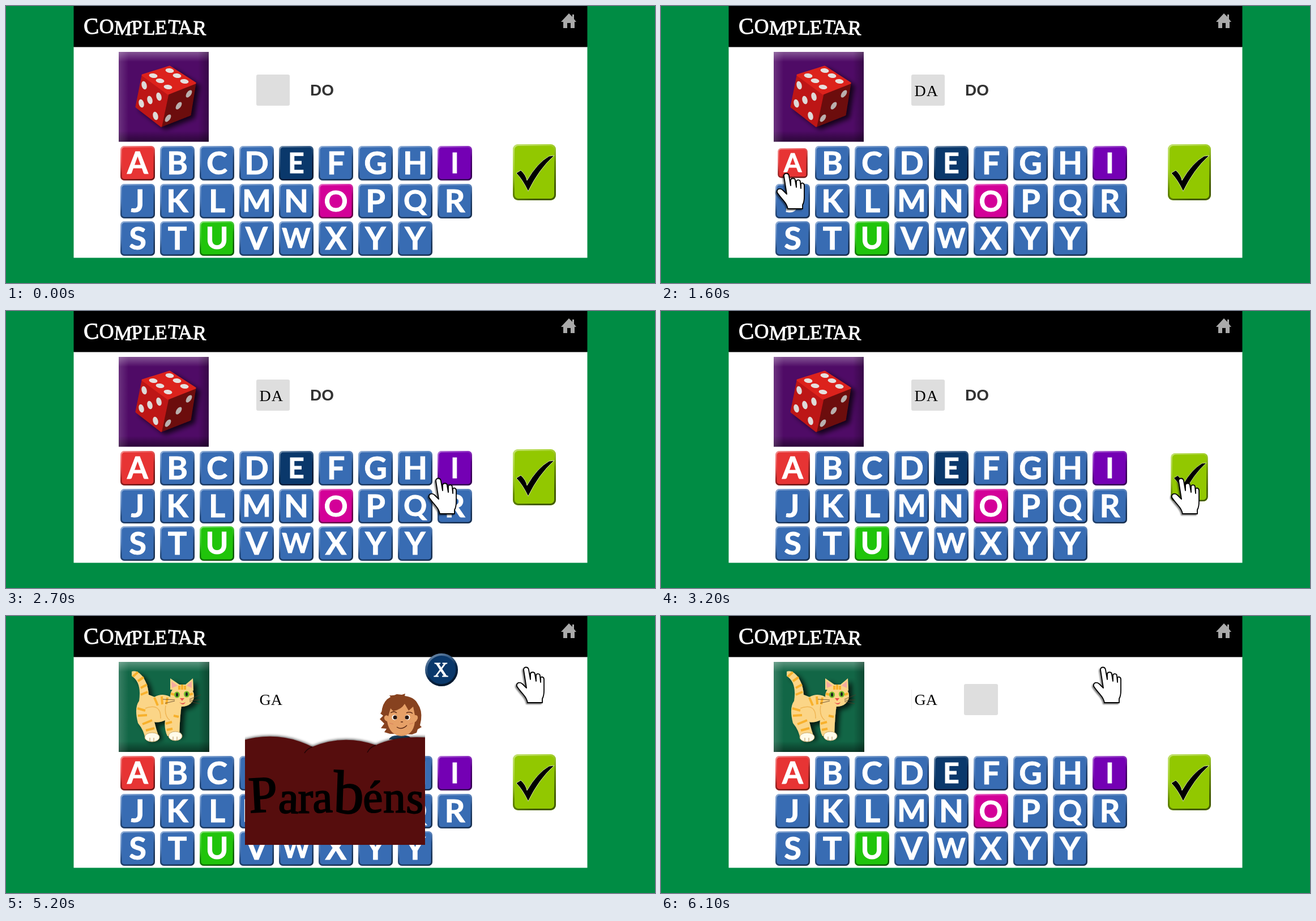
Animation of 1146x489 px, one loop 6.2 s. Source, as an HTML page:

```html
<!DOCTYPE html>
<html lang="pt">
<head>
<meta charset="utf-8">
<title>Completar</title>
<style>
  html, body { margin: 0; width: 100%; height: 100%; overflow: hidden; background: #008c44; }
  svg { display: block; }
  .serif { font-family: "Liberation Serif", serif; }
  .key text { font: 700 56px Lato, sans-serif; fill: #fff; stroke: #fff; text-anchor: middle; }
  .press { transform-box: fill-box; transform-origin: center; }
</style>
</head>
<body>
<svg width="1146" height="489" viewBox="0 0 1146 489">
  <defs>
    <linearGradient id="rim" x2=".5" y2="1">
      <stop stop-color="#fff" stop-opacity=".45"/>
      <stop offset=".35" stop-color="#fff" stop-opacity=".2"/>
      <stop offset=".65" stop-opacity=".3"/>
      <stop offset="1" stop-opacity=".55"/>
    </linearGradient>
    <linearGradient id="shadeY" x2="0" y2="1">
      <stop stop-color="#fff" stop-opacity=".3"/>
      <stop offset=".11" stop-color="#fff" stop-opacity="0"/>
      <stop offset=".88" stop-opacity="0"/>
      <stop offset="1" stop-opacity=".45"/>
    </linearGradient>
    <linearGradient id="shadeX">
      <stop stop-color="#fff" stop-opacity=".16"/>
      <stop offset=".11" stop-color="#fff" stop-opacity="0"/>
      <stop offset=".88" stop-opacity="0"/>
      <stop offset="1" stop-opacity=".3"/>
    </linearGradient>
    <filter id="drop" x="-30%" y="-30%" width="160%" height="160%">
      <feDropShadow dx="7" dy="5" stdDeviation="4" flood-opacity=".75"/>
    </filter>
    <filter id="handDrop" x="-30%" y="-30%" width="160%" height="160%">
      <feDropShadow dx="-2" dy="2" stdDeviation="1" flood-opacity=".5"/>
    </filter>
    <filter id="glow"><feDropShadow dx="0" dy="-1" stdDeviation="2.500" flood-opacity=".75"/></filter>
    <clipPath id="cardClip"><path d="M422 130H740V404H422Z"/></clipPath>
  </defs>

  <path fill="#fff" d="M119.500 72H1026.500V444.500H119.500Z"/>
  <path d="M119.500 0H1026.500V72.500H119.500Z"/>
  <text class="serif" x="138" y="50" dy="0 -2 2 0 0 0 -2 2 0" rotate="-4 0 3 -3 2 -2 4 -3 3"
        font-size="35.500" fill="#fff" stroke="#fff" stroke-width="1"><tspan font-size="40">C</tspan>OMPLETAR</text>
  <path fill="#aaa" d="M994 13L980 28H984V39H991V30H997V39H1004V28H1007L1003 23V15H1000V19Z"/>

  <g id="dicePage">
    <path fill="#4f0b66" d="M199 81H358V239.500H199Z"/>
    <path fill="url(#shadeY)" d="M199 81H358V239.500H199Z"/>
    <path fill="url(#shadeX)" d="M199 81H358V239.500H199Z"/>
    <g filter="url(#drop)" stroke-linejoin="round" stroke-width="3">
      <path fill="#6c0c0d" stroke="#6c0c0d" d="M286 155L334 136L325 192L274 212Z"/>
      <path fill="#bd1513" stroke="#bd1513" d="M241 123L286 155L274 212L230 178Z"/>
      <path fill="#dc231e" stroke="#dc231e" d="M241 122L289 107L334 136L286 155Z"/>
    </g>
    <g id="pips"></g>
    <rect x="442" y="121" width="59" height="55" rx="3" fill="#dedede"/>
    <text id="typed" class="serif" x="447.500" y="158.500" font-size="28" letter-spacing="1"></text>
    <text x="537" y="158" font-family="Liberation Sans, sans-serif" font-weight="700" font-size="28" fill="#333">DO</text>
  </g>

  <g id="catPage">
    <path fill="#126646" d="M199 81H359V240H199Z"/>
    <path fill="url(#shadeY)" d="M199 81H359V240H199Z"/>
    <path fill="url(#shadeX)" d="M199 81H359V240H199Z"/>
    <g filter="url(#drop)" fill="#fbd587">
      <path d="M222 98C235 93 251 114 252 139L262 143Q278 134 294 145L310 157Q307 177 306 210L285 212Q279 200 281 184Q270 189 262 187Q265 200 270 214L246 218Q244 202 233 189Q226 162 235 150Q240 117 222 106Z"/>
      <path d="M290 130L290 110L306 121H317L330 110L331 132Z"/>
      <ellipse cx="311" cy="141" rx="21" ry="19"/>
    </g>
    <g fill="#f5a9a0">
      <path d="M293 127L292 115L303 123Z"/><path d="M328 127L328 115L319 123Z"/>
    </g>
    <path fill="none" stroke="#f8b12c" stroke-width="4" d="M224 107L233 99M233 115L243 108M238 127L249 121M238 139L250 134M262 144L268 158M275 142L276 156M285 144L283 156M232 163L246 167M233 176L249 175M241 191L258 184M247 202L262 198M282 190L293 187M284 201L294 199M305 178L296 176M306 123V130M311 121V130M316 123V130M291 137L298 139M330 137L324 139"/>
    <path fill="none" stroke="#f0b655" stroke-width="1.500" d="M246 163Q274 153 273 181M282 158Q279 176 289 184"/>
    <g fill="#fffbea" stroke="#c9ac72">
      <ellipse cx="258" cy="214" rx="13" ry="8"/><ellipse cx="299" cy="212" rx="12" ry="8"/>
    </g>
    <path fill="none" stroke="#b8945b" d="M254 215V221M261 215V221M295 213V219M302 213V219"/>
    <g fill="#71bd2a">
      <ellipse cx="302" cy="139" rx="5" ry="5.500"/><ellipse cx="319" cy="138" rx="5" ry="5.500"/>
    </g>
    <g fill="#222">
      <ellipse cx="302" cy="139" rx="2" ry="3.500"/><ellipse cx="319" cy="138" rx="2" ry="3.500"/>
    </g>
    <path fill="#e8524f" d="M307 145H315L311 150ZM306 152Q311 156 317 152Q313 160 306 152Z"/>
    <path fill="none" stroke="#553c26" stroke-width=".8" d="M298 148L277 147M298 150L281 154M324 147L344 139M324 149L343 148M324 151L342 155"/>
    <text class="serif" x="447.500" y="157" font-size="28">GA</text>
    <g id="blank">
      <path stroke="#eee" d="M442.500 130V165"/>
      <rect x="535" y="120" width="60" height="55" rx="3" fill="#dedede"/>
    </g>
  </g>

  <g id="keys"></g>

  <g id="check" class="press">
    <rect x="895" y="244" width="76" height="99" rx="9" fill="#92c800"/>
    <rect x="896.500" y="245.500" width="73" height="96" rx="8" fill="none" stroke="url(#rim)" stroke-width="3"/>
    <path stroke="#eef5c8" stroke-width=".8" d="M901 295L909 290Q918 298 920 308Q938 277 959 265L968 264Q941 288 922 327Q912 306 901 295Z"/>
  </g>

  <g id="dialog">
    <g clip-path="url(#cardClip)">
      <path fill="#1f4668" d="M676 218Q680 209 697 211Q713 209 717 218Z"/>
      <path fill="#87421f" d="M660 182L666 176L661 172Q664 169 664 164Q667 149 679 143L677 140Q685 141 690 138L699 139L705 137L704 141Q721 143 727 155Q735 166 733 183L731 193L734 196L727 200L725 206L717 209L678 208L668 205L672 199L662 198L668 190Z"/>
      <path fill="#e6a067" d="M673 186Q667 184 668 178Q671 173 675 177L679 163L684 168Q698 165 704 155L711 167L719 160L722 175Q728 174 727 181Q724 187 722 187Q719 211 698 212Q677 210 673 186Z"/>
      <path fill="none" stroke="#5c2914" stroke-width="1.500" d="M679 171Q685 167 690 171M707 171Q713 168 718 172M690 196Q699 202 708 193M697 187H701"/>
      <path stroke="#d97f5c" d="M677 189L684 191M712 191L719 189"/>
      <g fill="#fff"><circle cx="686" cy="179" r="4.500"/><circle cx="709" cy="179" r="4.500"/></g>
      <g fill="#28150e"><circle cx="687" cy="179" r="3.500"/><circle cx="708" cy="179" r="3.500"/></g>
      <path filter="url(#glow)" fill="#560c0d" d="M410 222Q479 200 541 231Q596 208 653 228Q691 210 750 215V420H410Z"/>
      <path fill="none" stroke="#250506" stroke-width="1.500" d="M541 231Q532 234 527 242M653 228Q642 232 638 241"/>
    </g>
    <text class="serif" x="430" y="347" font-size="79" stroke="#000" stroke-width="2"
          rotate="-3 2 0 -2 2 -2 0 3"><tspan font-size="91">P</tspan>ara<tspan font-size="108">b</tspan>éns</text>
    <g id="close" class="press">
      <circle cx="769" cy="95" r="29" fill="#0a386b"/>
      <circle cx="769" cy="95" r="27" fill="none" stroke="url(#rim)" stroke-width="4"/>
      <text class="serif" x="768" y="107" font-size="36" fill="#fff" stroke="#fff" text-anchor="middle">X</text>
    </g>
  </g>

  <g id="hand">
    <path filter="url(#handDrop)" fill="#fff" stroke="#000" stroke-width="1.800" stroke-linejoin="round"
      d="M14 6C14 0 22 0 23 6L26 23V14C26 9 34 9 34 14L36 26V16C36 12 43 12 43 17L44 28V21C44 17 50 18 50 23V42Q50 52 47 57V64H21Q20 57 13 49Q6 41 2 35C1 28 8 27 12 31L19 38Z"/>
  </g>
</svg>
<script>
const $ = id => document.getElementById(id);
const LOOP = 6200, STEP = 100;

const vowels = { A: '#e73434', E: '#0a386b', I: '#7400b4', O: '#d30098', U: '#20c40b' };
const sizes = { A: 53, E: 50, I: 50, O: 52, U: 54, Q: 51, W: 48, M: 54 };
$('keys').innerHTML = [...'ABCDEFGHIJKLMNOPQRSTUVWXYY'].map((letter, i) => {
  const x = 202 + i % 9 * 70, y = Math.round(247 + Math.floor(i / 9) * 66.7), size = sizes[letter] || 56;
  return `<g class="key press" id="key${i}">
    <rect x="${x}" y="${y}" width="61" height="61" rx="7" fill="${vowels[letter] || '#386cb3'}"/>
    <rect x="${x + 1.25}" y="${y + 1.25}" width="58.500" height="58.500" rx="6" fill="none" stroke="url(#rim)" stroke-width="2.500"/>
    <text x="${x + 30.5}" y="${y + 30 + size * .36}" style="font-size:${size}px">${letter}</text></g>`;
}).join('');

const face = (points, rx, ry, turn, fill) => points.map(([x, y]) =>
  `<ellipse rx="${rx}" ry="${ry}" fill="${fill}" transform="translate(${x} ${y}) rotate(${turn})"/>`).join('');
$('pips').innerHTML =
  face([[260, 123], [289, 114], [272, 132], [302, 123], [286, 143], [315, 133]], 7.5, 4, 8, '#e6e0de') +
  face([[244, 140], [239, 172], [254, 166], [270, 160], [264, 194]], 4.5, 7.5, -15, '#dedad8') +
  face([[323, 155], [305, 176], [286, 198]], 4, 7.5, 35, '#b9b0ae');

// Pointer moves: start, end, from, to, easing
const easeIn = p => p ** 1.17, easeOut = p => 1 - (1 - p) ** 1.2;
const moves = [
  [700, 1500, [413, 294], [203, 294], easeIn],
  [1700, 3100, [203, 294], [900, 294], easeOut],
  [4300, 5100, [900, 294], [900, 89], easeIn],
  [5200, 5800, [900, 89], [762, 89], easeOut]
];
const presses = [['key3', 600], ['key0', 1600], ['check', 3200], ['close', 5900]];

const show = (id, on) => $(id).style.display = on ? '' : 'none';

function pointerAt(t) {
  const [start, end, from, to, ease] = moves.findLast(m => t >= m[0]) || moves[0];
  const k = ease(Math.min(1, Math.max(0, (t - start) / (end - start))));
  return from.map((v, i) => v + (to[i] - v) * k);
}

function draw() {
  const t = Math.floor(performance.now() % LOOP / STEP) * STEP;
  show('dicePage', t < 3400);
  show('catPage', t >= 3400);
  show('dialog', t >= 3400 && t < 6100);
  show('blank', t >= 6100);
  show('hand', t >= 500);
  $('typed').textContent = t < 600 ? '' : t < 1600 ? 'D' : 'DA';
  $('hand').setAttribute('transform', `translate(${pointerAt(t)})`);
  for (const [id, at] of presses)
    $(id).style.transform = t >= at && t < at + 200 ? 'scale(.86)' : '';
  requestAnimationFrame(draw);
}
draw();
</script>
</body>
</html>
```
